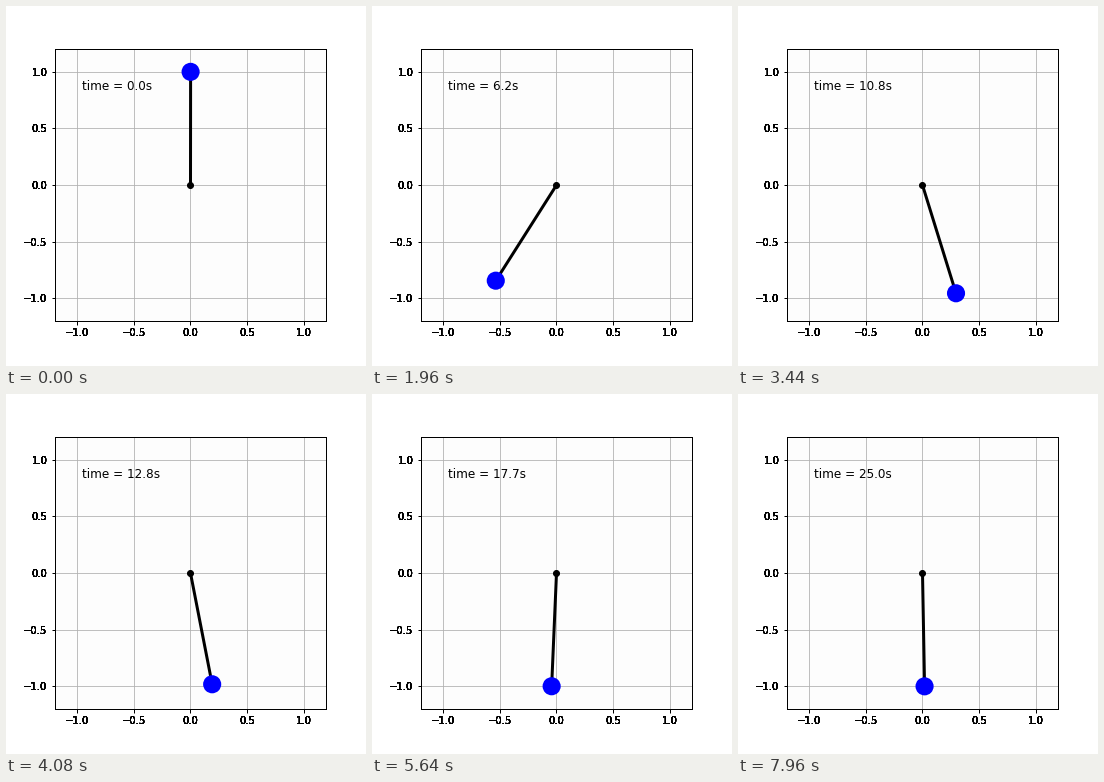
Write a matplotlib script that moves like this. It is 360 by 360 pixels and loops after 8 s.

```python
import numpy as np
import matplotlib.pyplot as plt
from matplotlib.animation import FuncAnimation
from matplotlib.patches import Circle

SIZE, DPI = 360, 72
FRAMES, INTERVAL = 200, 40
DURATION = 25.0

GRAVITY, DAMPING = 9.81, 0.4156
PASS_TIME, PASS_ANGLE = 2.638, 1.354  # moment and angle of the first fall

plt.rcParams.update({"font.family": "DejaVu Sans", "font.size": 10})


def rate(state):
    angle, speed = state
    return np.array([speed, -DAMPING * speed - GRAVITY * np.sin(angle)])


def swing(times, step=0.005):
    """Angles of a damped pendulum that tips over from the upright position."""
    clock = np.arange(0, DURATION + 2, step)
    path = np.empty(len(clock))
    state = np.array([np.pi - 0.0005, 0.0])
    for i in range(len(clock)):
        path[i] = state[0]
        k1 = rate(state)
        k2 = rate(state + step / 2 * k1)
        k3 = rate(state + step / 2 * k2)
        k4 = rate(state + step * k3)
        state = state + step / 6 * (k1 + 2 * k2 + 2 * k3 + k4)
    i = np.argmax(path < PASS_ANGLE)
    hit = clock[i] - step * (PASS_ANGLE - path[i]) / (path[i - 1] - path[i])
    return np.interp(times + hit - PASS_TIME, clock, path)


def tick_labels(ax, ticks, copies=10):
    """Stacked copies give the labels hard, heavy edges."""
    x_trans, x_va, x_ha = ax.get_xaxis_text1_transform(7)
    y_trans, y_va, y_ha = ax.get_yaxis_text1_transform(7)
    for v in ticks:
        label = f"{v:.1f}".replace("-", "\u2212")
        for _ in range(copies):
            ax.text(v, 0, label, transform=x_trans, va=x_va, ha=x_ha)
            ax.text(0, v, label, transform=y_trans, va=y_va, ha=y_ha)


times = np.linspace(0, DURATION, FRAMES)
angles = swing(times)

fig = plt.figure(figsize=(SIZE / DPI, SIZE / DPI), dpi=DPI, facecolor="white")
ax = fig.add_axes([0.135, 0.125, 0.755, 0.755], facecolor="#fdfdfd")
ticks = np.linspace(-1, 1, 5)
ax.set(xlim=(-1.2, 1.2), ylim=(-1.2, 1.2), xticks=ticks, yticks=ticks)
ax.tick_params(width=1, labelbottom=False, labelleft=False)
for spine in ax.spines.values():
    spine.set_linewidth(1)
ax.grid()
tick_labels(ax, ticks)

rod, = ax.plot([], [], "o-", color="k", lw=3, markersize=6)
bob = ax.add_patch(Circle((0, 1), 0.08, fc="b", zorder=3))
clock_text = ax.text(0.1, 0.85, "", transform=ax.transAxes, fontsize=12)


def update(i):
    x, y = np.sin(angles[i]), -np.cos(angles[i])
    rod.set_data([0, x], [0, y])
    bob.center = x, y
    clock_text.set_text(f"time = {times[i]:.1f}s")
    return rod, bob, clock_text


anim = FuncAnimation(fig, update, frames=FRAMES, interval=INTERVAL,
                     repeat=True, repeat_delay=0)
plt.show()
```
